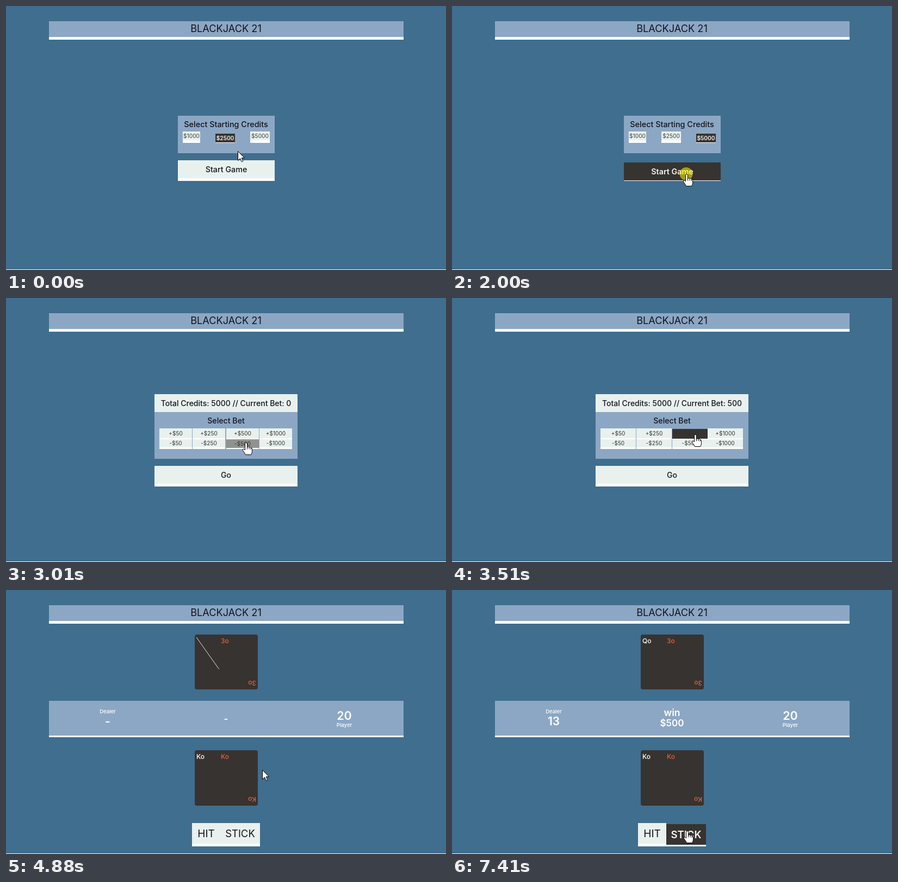
Recreate the animation shown at these times as an HTML page with a canvas. Size 809 px wide and 486 px high, loop 8000 ms.

```html
<!DOCTYPE html>
<html lang="en">
<head>
<meta charset="utf-8">
<title>Blackjack 21</title>
<style>
  html, body { margin: 0; width: 100%; height: 100%; overflow: hidden; background: #406e8e; }
  canvas { display: block; }
</style>
</head>
<body>
<canvas id="stage" width="809" height="486"></canvas>
<script>
const ctx = document.getElementById('stage').getContext('2d');
const LOOP = 8000;
const TABLE = '#406e8e', PANEL = '#8ca7c4', INK = '#14141c', RED = '#d9633f';
const LIGHT = [232, 241, 238], DARK = [55, 51, 48];

const run = (start, count) => Array.from({ length: count }, (_, i) => start + Math.round(i * 12.5) * 10);
const ticks = [0, ...run(260, 7), 1120, ...run(1270, 5), 2000, 2130, ...run(2500, 7),
  3390, 3510, 3640, 3760, ...run(3900, 4), 4630, 4750, 4880, 5380,
  ...run(5760, 4), 7040, 7160, 7280, 7410];

const path = [[0, 426, 267], [140, 426, 267], [270, 432, 281], [990, 466, 240], [1150, 466, 240],
  [1750, 431, 309], [2380, 431, 309], [2500, 425, 307], [3260, 447, 251], [3760, 447, 251],
  [4270, 471, 331], [5260, 471, 331], [5380, 483, 334], [5640, 483, 334], [6060, 432, 443]];
const clicks = [990, 2000, 3390, 4630, 7040];

const arrow = new Path2D('M0 0V17L4 13.2L6.8 19.3L9.4 18.2L6.8 12.2H12Z');
const hand = new Path2D('M-2 2Q-2 0 0 0Q2 0 2 2V8Q4 6.5 6 8Q8 7.3 9 9.3Q11 9 11 12V16Q11 19 9 22H-1' +
  'Q-3 18 -6 14Q-7 11 -4 11.5L-2 13.5Z');
const creases = new Path2D('M2 7V12M5.5 8V12M8.7 9.3V12.5');

let now = 0, clicking = false, pointing = false;

function cursorAt(t) {
  const next = path.findIndex(key => key[0] > t);
  if (next < 0) return path[path.length - 1].slice(1);
  if (next === 0) return path[0].slice(1);
  const [t0, x0, y0] = path[next - 1], [t1, x1, y1] = path[next];
  const f = (t - t0) / (t1 - t0), e = f * f * (3 - 2 * f);
  return [x0 + (x1 - x0) * e, y0 + (y1 - y0) * e];
}

const mix = (a, b, f) => `rgb(${a.map((v, i) => Math.round(v + (b[i] - v) * f))})`;

function rect(x, y, w, h, color) {
  ctx.fillStyle = color;
  ctx.fillRect(x, y, w, h);
}

function text(label, x, middle, size, color = INK, weight = 400, align = 'center') {
  ctx.font = `${weight} ${size}px Inter, sans-serif`;
  ctx.textAlign = align;
  ctx.fillStyle = color;
  ctx.fillText(label, x, middle + size * 0.364);
}

function button(label, x, y, w, h, size, { lift = 5, weight = 400, ink = INK, selected = false, lit = false } = {}) {
  const inside = t => {
    const [cx, cy] = cursorAt(t);
    return cx >= x && cx <= x + w && cy >= y && cy < y + h;
  };
  const over = inside(now);
  const hover = selected ? 1 : (over + inside(now - 125)) / 2;
  const active = selected || (over && clicking);
  const shift = Math.round((lift - 1) * (active ? 1 : hover / 2));
  const face = h - lift;
  if (over) pointing = true;
  rect(x, y + shift, w, h - shift, '#fff');
  rect(x, y + shift, w, face, mix(LIGHT, DARK, hover));
  const bright = active || lit;
  text(label, x + w / 2, y + shift + face / 2, size, bright ? '#f4f4f0' : ink, bright ? 600 : weight);
}

function creditScreen() {
  rect(316, 202, 178, 69, PANEL);
  text('Select Starting Credits', 404.5, 218, 14.4, INK, 500);
  const choice = now < 1120 ? 2500 : 5000;
  [[1000, 325, 32], [2500, 385, 36], [5000, 449, 36]].forEach(([value, x, w]) =>
    button('$' + value, x, 231, w, 21, 10.2, { ink: '#3a3a3a', selected: value === choice }));
  button('Start Game', 316, 284, 178, 38, 14.3, { weight: 500 });
}

function betScreen() {
  const bet = now < 3510 ? 0 : 500;
  const x = bet ? 264 : 273, w = bet ? 281 : 263;
  const column = (w - 18) / 4;
  rect(x, 177, w, 33, mix(LIGHT, DARK, 0));
  text(`Total Credits: 5000 // Current Bet: ${bet}`, 404.5, 193.5, 14, INK, 500);
  rect(x, 210, w, 86, PANEL);
  text('Select Bet', 404.5, 226, 14.2, INK, 500);
  [50, 250, 500, 1000].forEach((value, i) => {
    const left = Math.round(x + 9 + i * column), width = Math.floor(column - 0.75);
    button('+$' + value, left, 240, width, 20, 10.1, { lift: 2, ink: '#34312e' });
    button('-$' + value, left, 260, width, 18, 10.1, { lift: 3, ink: '#34312e' });
  });
  button('Go', x, 309, w, 38, 14, { weight: 500 });
}

function cards(y, h, first, second) {
  ctx.fillStyle = mix(LIGHT, DARK, 1);
  ctx.beginPath();
  ctx.roundRect(347, y, 116, h, 4);
  ctx.fill();
  text(first, 350, y + 11.5, 12, '#fff', 500, 'left');
  text(second, 395, y + 11.5, 12, RED, 500, 'left');
  ctx.save();
  ctx.translate(460, y + h - 12);
  ctx.rotate(Math.PI);
  text(second, 0, 0, 12, RED, 500, 'left');
  ctx.restore();
}

function gameScreen() {
  const done = now >= 7160;
  cards(82, 101, done ? 'Qo' : '', '3o');
  if (!done) {
    ctx.strokeStyle = '#e8e8e4';
    ctx.lineWidth = 1;
    ctx.beginPath();
    ctx.moveTo(350, 87);
    ctx.lineTo(391.5, 145.5);
    ctx.stroke();
  }
  rect(79, 204, 652, 64, PANEL);
  rect(79, 268, 652, 3, '#fff');
  text('Dealer', 187, 223.5, 9.5, '#fff', 500);
  text(done ? '13' : '-', 187, 241, 21, '#fff', 600);
  text('20', 622, 231, 21.5, '#fff', 600);
  text('Player', 622, 248.5, 9.5, '#fff', 500);
  if (done) {
    text('win', 404.5, 225.5, 17.5, '#fff', 600);
    text('$500', 404.5, 245, 17, '#fff', 600);
  } else {
    text('-', 404.5, 236.5, 17, '#fff', 600);
  }
  cards(295, 102, 'Ko', 'Ko');
  button('HIT', 342, 429, 52, 43, 19);
  button('STICK', 394, 429, 73, 43, 18.5, { lit: now >= 7040 });
}

function drawCursor() {
  const [x, y] = cursorAt(now).map(Math.round);
  if (clicking) {
    ctx.fillStyle = 'rgba(255, 245, 0, 0.55)';
    ctx.beginPath();
    ctx.arc(x - 0.5, y, 12, 0, Math.PI * 2);
    ctx.fill();
  }
  const shape = pointing ? hand : arrow;
  ctx.save();
  ctx.translate(x + 0.5, y + 0.5);
  ctx.fillStyle = '#fff';
  ctx.strokeStyle = '#000';
  ctx.lineWidth = 1;
  ctx.fill(shape);
  ctx.stroke(shape);
  if (pointing) ctx.stroke(creases);
  ctx.restore();
}

function draw(time) {
  const t = time % LOOP;
  now = ticks.filter(tick => tick <= t).pop();
  clicking = clicks.some(c => now >= c && now < c + 120);
  pointing = false;

  rect(0, 0, 809, 486, TABLE);
  rect(0, 485, 809, 1, '#fff');
  rect(79, 28, 652, 29, PANEL);
  rect(79, 57, 652, 5, '#fff');
  text('BLACKJACK 21', 404.5, 41.5, 18.2);

  if (now < 2130) creditScreen();
  else if (now < 4750) betScreen();
  else gameScreen();
  drawCursor();
}

function frame() {
  draw(performance.now());
  requestAnimationFrame(frame);
}
frame();
</script>
</body>
</html>
```
